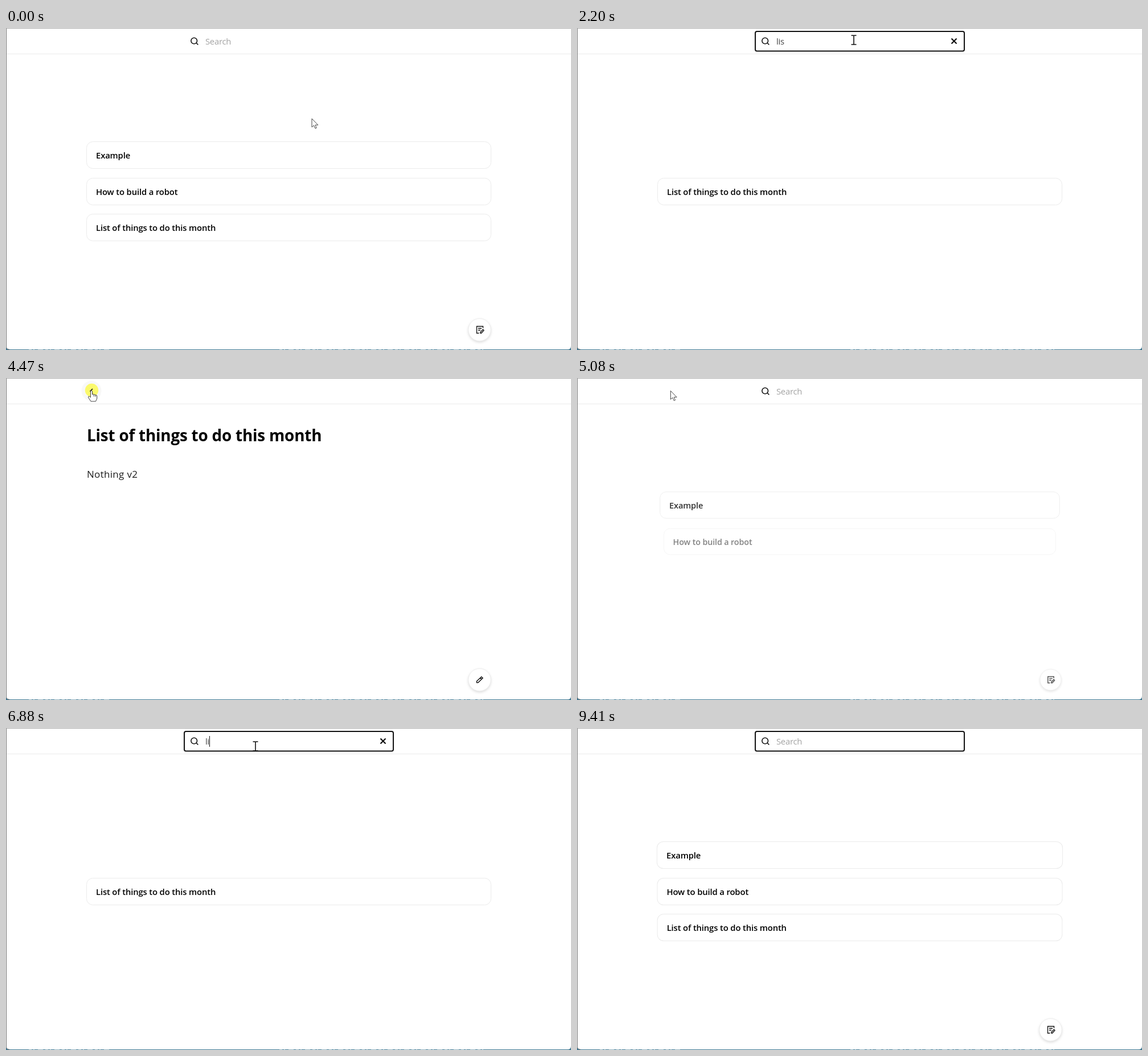
Recreate the animation shown at these times as an HTML page. Size 992 by 565 pixels, loop 9.47 s.

```html
<!DOCTYPE html>
<html lang="en">
<head>
<meta charset="utf-8">
<title>Notes</title>
<style>
  html, body { margin: 0; width: 100%; height: 100%; overflow: hidden; background: #fff; }
  svg { display: block; font: 14.8px "Open Sans", "Noto Sans", sans-serif; }
  text { white-space: pre; }
  .line { fill: none; stroke: #111; stroke-width: 1.6; }
  .thin { stroke-width: 1.4; }
  .card { fill: #fff; stroke: #ebebeb; }
  .label { font-weight: 600; letter-spacing: -.13px; }
  .field { letter-spacing: -.25px; }
  .title { font-size: 27.8px; font-weight: 700; letter-spacing: -.18px; }
  .body { font-size: 17px; letter-spacing: .3px; fill: #1c1c1c; }
  .round { fill: #fff; stroke: #ececec; filter: drop-shadow(0 2px 2px #0002); }
  .pointer { fill: #fff; stroke: #333; stroke-width: .9; stroke-linejoin: round; }
</style>
</head>
<body>
<svg width="992" height="565" viewBox="0 0 992 565">
  <rect width="992" height="565" fill="#3a7590"/>
  <path d="M40 564.5H185M480 564.5H840" stroke="#8fb0be" stroke-dasharray="5 3 2 6 9 4"/>
  <path d="M0 0H992V558Q992 564 986 564H6Q0 564 0 558Z" fill="#fff"/>
  <path d="M.5 0V558Q.5 564 6 564" fill="none" stroke="#777"/>
  <path d="M0 .5H992" stroke="#aaa"/>
  <path d="M1 45.5H992" stroke="#ececec"/>

  <g id="search">
    <rect id="focus" class="line" x="313" y="6" width="367" height="34.5" rx="3" style="stroke-width:2"/>
    <path class="line" d="M334.5 26.5L337.3 29.5M335.5 22.5a5.3 5.3 0 1 1-10.6 0a5.3 5.3 0 1 1 10.6 0"/>
    <text id="query" class="field" x="350" y="29.3"></text>
    <path id="clear" class="line" style="stroke-width:2.2" d="M657.5 18.5l9 9m0-9l-9 9"/>
    <path id="caret" d="M0 14V33" stroke="#111"/>
  </g>

  <g id="rows"></g>
  <circle id="halo" cx="150" cy="22.5" r="17.5" fill="#f8f8f8"/>
  <circle id="dot" r="11.7" fill="#fbf96c"/>

  <g id="note">
    <path id="back" class="line" d="M152 19l-4 4 4 4"/>
    <text id="title" class="title">List of things to do this month</text>
    <text id="body" class="body" x="142" y="175">Nothing v2</text>
  </g>

  <g id="button">
    <circle class="round" r="19.7"/>
    <path id="compose" class="line thin"
      d="M6-3V-6H-5V6H-1M-2.5-2.5H3.5M-2.5.8H1.5M1.5 6V4L6-.5 7.5 1 3 6Z"/>
    <path id="pencil" class="line thin" d="M-5 5V2.6L3.3-5.2 5.6-3-2.6 5ZM1.2-3.2L3.6-.9"/>
  </g>

  <g id="cursor">
    <path id="arrow" class="pointer" d="M0 0V15L3.5 11.9 6 17.3 8.2 16.3 6 11.2H10.8Z"/>
    <path id="ibeam" class="line" d="M-4.5-8H-1Q0-8 0-7Q0-8 1-8H4.5M0-7V7M-4.5 8H-1Q0 8 0 7Q0 8 1 8H4.5"/>
    <path id="hand" class="pointer" d="M-1.5 1Q0-1 1.5 1V7Q3 5.7 4.2 7.2Q6 6 7 8Q9.5 7 9.7 10V14L7.5 19H-1L-5.5 12Q-5.5 9.5-3.5 10.3L-1.5 12ZM4.2 7.2V10.5M7 8V11"/>
  </g>
</svg>
<script>
// The story, in ms.
const LOOP = 9470;
const FOCUS = 530, TYPE = 1520, OPEN = 3400, BACK = 4730;
const REFOCUS = 5740, RETYPE = 6620, ERASE = 7930, EMPTY = 8270, LEAVE = 9400;
const NOTE_IN = OPEN + 140, LIST_IN = BACK + 200;
const FADE_OUT = 140, FADE_IN = 360, KEY = 65, BLINK = 530, CLICK = 90;

const $ = id => document.getElementById(id);
const clamp = v => Math.min(1, Math.max(0, v));
const easeOut = p => 1 - (1 - p) ** 3;
const smooth = p => p * p * (3 - 2 * p);
const between = (t, a, b) => t >= a && t < b;
const ramp = (t, start, length, ease = easeOut) => ease(clamp((t - start) / length));
const show = (id, v) => $(id).setAttribute("opacity", +v);
const place = (el, x, y, s = 1) => el.setAttribute("transform", `translate(${x} ${y}) scale(${s})`);

// Each gap is [fade out, fade in].
function presence(t, ...gaps) {
  const [out, back] = gaps.findLast(gap => t >= gap[0]) ?? [Infinity, Infinity];
  return t < back ? 1 - ramp(t, out, FADE_OUT) : ramp(t, back, FADE_IN);
}

const labels = ["Example", "How to build a robot", "List of things to do this month"];
$("rows").innerHTML = labels.map(label =>
  `<g><rect class="card" x="-355" y="-23.5" width="710" height="47" rx="11"/>
   <text class="label" x="-338.5" y="6">${label}</text></g>`).join("");
const rows = [...$("rows").children];

// Pointer glides: start, length, x, y.
const glides = [[70, 400, 486, 21], [2690, 440, 425, 288], [4160, 290, 150, 22],
  [5000, 600, 438, 32], [9160, 240, 940, 490]];
const clicks = [FOCUS, OPEN - CLICK, BACK - 290, REFOCUS];
const inputs = [FOCUS + 60, TYPE, TYPE + 2 * KEY, REFOCUS + 70, RETYPE, ERASE, EMPTY];

function pointerAt(t) {
  return glides.reduce(([x, y], [start, length, toX, toY]) => {
    const p = ramp(t, start, length, smooth);
    return [x + (toX - x) * p, y + (toY - y) * p];
  }, [537, 159]);
}

function queryAt(t) {
  if (t < OPEN) return "lis".slice(0, Math.max(0, Math.ceil((t - TYPE) / KEY)));
  return t < RETYPE || t >= EMPTY ? "" : t < ERASE ? "li" : "l";
}

function drawSearch(t) {
  const query = queryAt(t);
  const focused = between(t, FOCUS, OPEN) || t >= REFOCUS;
  const idle = t - (inputs.findLast(time => t >= time) ?? t);
  show("search", presence(t, [OPEN, BACK]));
  show("focus", focused);
  show("clear", query);
  show("clear", query !== "");
  $("query").textContent = query || "Search";
  $("query").setAttribute("fill", query ? "#444" : "#a3a3a3");
  show("caret", focused && t < LEAVE && idle % (2 * BLINK) < BLINK);
  place($("caret"), 350.5 + (query && Math.round($("query").getComputedTextLength())), 0);
}

function drawRows(t) {
  rows.forEach((row, i) => {
    const last = i === 2, lag = i * 80;
    const opacity = last
      ? presence(t, [OPEN, LIST_IN + lag])
      : presence(t, [TYPE, LIST_IN + lag], [RETYPE - 70, ERASE + lag]);
    const filtered = between(t, TYPE + 330, BACK) || between(t, RETYPE + 250, ERASE);
    const hover = last && t < OPEN + FADE_OUT ? ramp(t, 2880, 250) : 0;
    const brush = ramp(t, LEAVE - 200, 200) / (i + 1);
    row.setAttribute("opacity", opacity);
    place(row, 496.5, 223 + Math.ceil(63.5 * (last && filtered ? 1 : i)),
      (.94 + .06 * opacity) * (1 + .03 * hover + .003 * brush));
  });
}

function drawNote(t) {
  const enter = ramp(t, NOTE_IN, FADE_IN);
  show("note", t < BACK ? t >= OPEN : 1 - ramp(t, BACK, FADE_OUT));
  show("title", enter);
  place($("title"), 142, 111, .945 + .055 * enter);
  show("back", enter);
  place($("back"), 13.6 * (1 - enter), 0);
  show("body", ramp(t, NOTE_IN + 160, FADE_IN));
}

function drawButton(t) {
  const v = presence(t, [TYPE, NOTE_IN], [BACK, LIST_IN], [RETYPE - 70, EMPTY]);
  const onNote = between(t, OPEN, LIST_IN);
  show("button", v);
  place($("button"), 831.5, 529.5, .68 + .32 * v);
  show("pencil", onNote);
  show("compose", !onNote);
}

function drawPointer(t) {
  const [x, y] = pointerAt(t);
  const onNote = between(t, OPEN, BACK);
  const onBack = onNote && Math.hypot(x - 150, y - 22) < 18;
  const onField = !onNote && y < 41 && x > 313 && x < 680;
  const onCard = !onNote && x > 142 && x < 851 && (t < OPEN ? y > 263 : y > 199 && y < 374);
  const kind = onField ? "ibeam" : onBack || onCard ? "hand" : "arrow";
  for (const id of ["arrow", "ibeam", "hand"]) show(id, id === kind);
  show("halo", onBack);
  show("cursor", t < LEAVE);
  place($("cursor"), x, y);
  show("dot", clicks.some(time => between(t, time, time + CLICK)));
  place($("dot"), x + .5, y - .5);
}

function frame() {
  const t = performance.now() % LOOP;
  for (const draw of [drawSearch, drawRows, drawNote, drawButton, drawPointer]) draw(t);
  requestAnimationFrame(frame);
}
frame();
</script>
</body>
</html>
```
